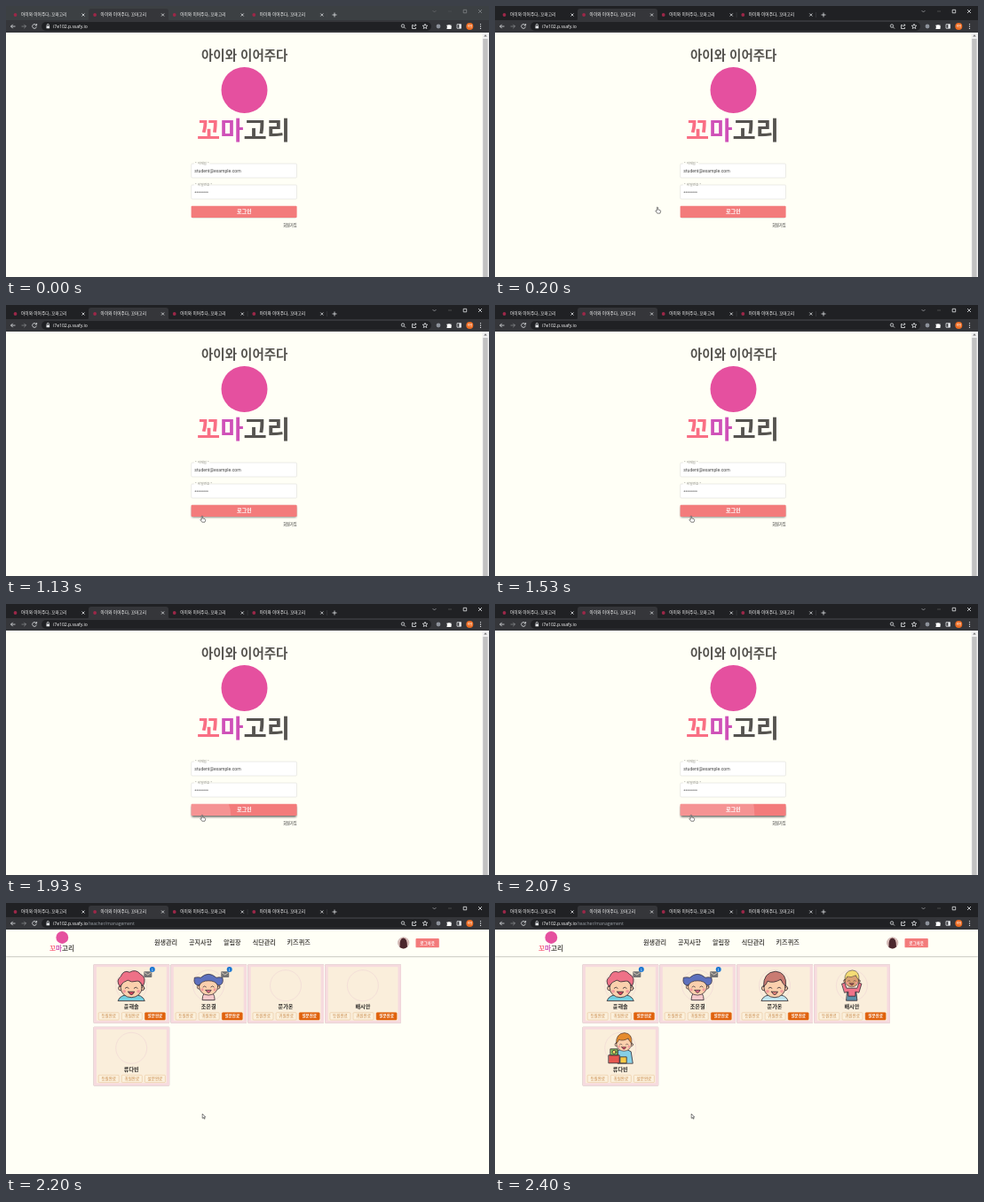
These frames come from a looping animation (544 by 306 pixels, 3.34 s). An HTML page:

```html
<!DOCTYPE html>
<html lang="ko">
<head>
<meta charset="utf-8">
<title>꼬마고리</title>
<style>
html, body { margin: 0; width: 100%; height: 100%; overflow: hidden; background: #fffff6; }
svg { display: block; width: 100vw; height: 100vh; font-family: "Noto Sans CJK KR", "Noto Sans CJK", sans-serif; }
.latin { font-family: "Open Sans", sans-serif; }
.form { font-family: Roboto, sans-serif; }
.icon { fill: none; stroke: #e4e6e9; stroke-width: .8; }
.kid { stroke: #2f2932; stroke-width: .8; stroke-linejoin: round; stroke-linecap: round; }
</style>
</head>
<body>
<svg id="stage" viewBox="0 0 544 306"></svg>
<script>
const LOOP = 3340, TICK = 1000 / 15;
const CORAL = '#f37b7b', INK = '#55534f';

const rect = (x, y, w, h, fill, more = '') => `<rect x="${x}" y="${y}" width="${w}" height="${h}" fill="${fill}" ${more}/>`;
const circle = (x, y, r, fill, more = '') => `<circle cx="${x}" cy="${y}" r="${r}" fill="${fill}" ${more}/>`;
const path = (d, fill = 'none', more = '') => `<path d="${d}" fill="${fill}" ${more}/>`;
const icon = (d, more = '') => `<path class="icon" d="${d}" ${more}/>`;
const group = (id, body, more = '') => `<g id="${id}" ${more}>${body}</g>`;
// y is the middle of the line
const text = (x, y, size, str, fill, more = '') =>
  `<text x="${x}" y="${y + size * .37}" font-size="${size}" fill="${fill}" ${more}>${str}</text>`;
const MID = 'text-anchor="middle" ', BOLD = 'font-weight="700"';

function browser() {
  const tabs = [0, 1, 2, 3].map(i => {
    const x = 89.6 * i;
    return circle(x + 10.5, 10, 1.9, '#9c2748') +
      text(x + 17, 9.6, 4.7, '아이와 이어주다, 꼬마고리', '#fff') +
      icon(`M${x + 85.5} 8.5l3 3m0 -3l-3 3`) +
      (i > 1 ? rect(x + 92.6, 7, .5, 6, '#44474b') : '');
  }).join('');
  return rect(0, 0, 544, 16.5, '#202124', 'id="frame"') +
    path('M91 16.5q2 0 2 -2v-8.500q0 -3 3 -3h84q3 0 3 3v8.500q0 2 2 2z', '#35363a') + tabs +
    icon('M367.500 10h5m-2.500 -2.500v5') +
    group('controls', icon('M480.500 5l2 2l2 -2', 'opacity=".6"') + icon('M498 6h4', 'opacity=".25"') +
      icon('M515.200 4.300h3.500v3.500h-3.500z', 'stroke-width=".6"') + icon('M532 4l4 4m0 -4l-4 4')) +
    rect(0, 16, 544, 14, '#35363a') + rect(40, 18, 439, 10, '#202124', 'rx="5"') +
    icon('M10.500 23h-5m2.200 -2.200l-2.200 2.200l2.200 2.200') +
    icon('M17.500 23h5m-2.200 -2.200l2.200 2.200l-2.200 2.200', 'opacity=".45"') +
    icon('M34 21.500a2.400 2.400 0 1 0 .4 2M34.600 20v2h-2') +
    rect(45.5, 22.5, 3.6, 2.8, '#e4e6e9') + icon('M46.200 22.500v-1a1.100 1.100 0 0 1 2.200 0v1', 'stroke-width=".6"') +
    `<text class="latin" x="53" y="24.900" font-size="5.050" fill="#fff">i7e102.p.ssafy.io<tspan id="route" fill="#9aa0a6">/teacher/management</tspan></text>` +
    circle(447, 22.5, 1.7, 'none', 'class="icon"') + icon('M448.300 23.800l1.700 1.700') +
    icon('M459 21.500h-1.500v4h4v-1.500M459 23.500q.5 -2 3 -2m-1.200 -1.200l1.200 1.200l-1.200 1.200') +
    icon('M472 20.300l.8 1.800l2 .1l-1.500 1.300l.5 2l-1.800 -1.100l-1.800 1.100l.5 -2l-1.500 -1.300l2 -.1z') +
    circle(487, 23, 2.4, '#8d929b') +
    path('M496.500 21.500h1.600a1 1 0 0 1 1.800 0h1.600v1.500a1 1 0 0 1 0 1.600v1.400h-5v-1.400a.9 .9 0 0 0 0 -1.600z', '#fff') +
    icon('M508 20.700h4.500v4.500h-4.500z') + rect(510.3, 20.7, 2.2, 4.5, '#e4e6e9') +
    circle(522.3, 23, 4, '#ee6c22') + text(522.3, 23, 3.2, '새별', '#fff', MID) +
    [20.6, 23, 25.4].map(y => circle(534.5, y, .65, '#e4e6e9')).join('');
}

const logo = () => circle(268.5, 95, 26, '#e5509f') +
  `<text x="215" y="151" font-size="28.500" font-weight="900" fill="${INK}"><tspan fill="#f96f84">꼬</tspan><tspan fill="#cf50b8">마</tspan>고리</text>`;

function login() {
  const field = (y, label) => rect(208.7, y, 118.8, 16, '#fff', 'rx="1.200" stroke="#d2d2cd" stroke-width=".45"') +
    rect(212, y - 1, 17.5, 2, '#fffffa') + text(213, y - .6, 3.7, label, '#85857f');
  const dots = Array.from({ length: 8 }, (_, i) => circle(213.3 + i * 1.95, 210.2, .65, '#555')).join('');
  return text(220, 56, 14.5, '아이와 이어주다', INK, BOLD) + logo() +
    field(178, '* 이메일 *') + `<text class="form" x="212.300" y="187.900" font-size="5.100" fill="#444">student@example.com</text>` +
    field(202, '* 비밀번호 *') + dots +
    rect(209.2, 226.2, 117.8, 12.6, '#000', 'rx="1" id="shadow"') +
    rect(208.6, 225.8, 119, 13.2, CORAL, 'rx=".9"') +
    circle(222, 238, 0, '#fff', 'id="ripple" fill-opacity=".18" clip-path="url(#buttonClip)"') +
    text(268.3, 231.8, 6.1, '로그인', '#fff', MID + BOLD) +
    text(327.6, 247.4, 4.2, '회원가입', '#222', 'text-anchor="end"') +
    rect(536.5, 30, 7.5, 276, '#f1f1f1') + rect(537.2, 37, 5.4, 269, '#c1c1c1') + path('M538.200 34.500l1.800 -2.200l1.800 2.200z', '#777');
}

function header() {
  const menu = ['원생관리', '공지사항', '알림장', '식단관리', '키즈퀴즈'];
  const left = [167, 206, 245, 277.700, 316.600];
  return rect(0, 30, 544, 30, '#fffff6', 'style="filter:drop-shadow(0 .7px .9px rgba(0,0,0,.5))"') +
    `<g transform="translate(-8.400 13.600) scale(.267)">${logo()}</g>` +
    menu.map((m, i) => text(left[i], 44.8, 7.1, m, INK, BOLD)).join('') +
    circle(447.7, 45, 6.5, '#c5c5c3') +
    group('photo', circle(447.7, 45, 6.5, '#d9bcb8') +
      path('M443.500 50q-.5 -10.500 4 -10.500t4.500 10q-4 3.500 -8.500 .5z', '#4b272d')) +
    rect(461.5, 40, 26.3, 10.3, CORAL, 'rx=".9"') + text(474.6, 45.1, 4.5, '로그아웃', '#fff', MID + BOLD);
}

// Children are drawn around their own centre.
const SKIN = '#fbd0ad';
function face(hair, hairShape, mouth, skin = SKIN) {
  return circle(-12, 3, 2.6, skin) + circle(12, 3, 2.6, skin) +
    `<ellipse cy="2.500" rx="12" ry="11" fill="${skin}"/>` + path(hairShape, hair) +
    path('M-7 3q2 -2.500 4 0M3 3q2 -2.500 4 0') + path('M-3.500 7h7q-3.500 7 -7 0z', mouth) +
    circle(-8, 6.5, 1.8, '#f29a9c', 'stroke="none"') + circle(8, 6.5, 1.8, '#f29a9c', 'stroke="none"');
}
const SPIKES = 'M-13 1Q-18 -6 -12 -10Q-9 -18 -2 -15Q5 -19 10 -13Q18 -9 13 1Q10 -6 6 -5Q0 -3 -4 -6Q-9 -5 -13 1z';
const CAP = 'M-12.500 1Q-13 -15 1 -16Q14 -15 12.500 1Q8 -3 7 -7Q-2 -2 -8 -5Q-9 -1 -12.500 1z';
const TAILS = 'M-12 1Q-20 1 -18 -9Q-13 -10 -10 -9Q0 -18 10 -9Q13 -10 18 -9Q20 1 12 1Q9 -5 0 -5Q-9 -5 -12 1z';
const shirt = color => path('M-15 17Q-13 10 0 10Q13 10 15 17z', color);
const small = (body, x, y, s) => `<g transform="translate(${x} ${y}) scale(${s})">${body}</g>`;

const kids = [
  shirt('#72cfe0') + face('#ee7187', SPIKES, '#d9455f'),
  path('M-7 16Q-7 7 0 7Q7 7 7 16z', '#f7c9cb') + small(face('#5d70bd', TAILS, '#e7708a'), 0, -1, .88),
  shirt('#bfe4ee') + face('#c97b72', CAP, '#e8837c'),
  path('M-5 8h10l1 9h-12z', '#5b8fa8') + path('M-11 -2l3 -1l2 6h12l2 -6l3 1l-3 10l-4 -1v5h-8v-5l-4 1z', '#f07389') +
    small(face('#f4dc75', CAP, '#a94f4f', '#d9a073'), 0, -7, .64),
  path('M-3 17v-14q7 -4 15 1l2 13z', '#86cfe6') + small(face('#e58b2d', CAP, '#d9455f'), 4, -6, .7) +
    rect(-13, 8, 12, 9, '#e5564f') + rect(-11, 1, 8, 7, '#7cbf5a') + circle(-7, 4.5, 2, '#ffe169') + rect(0, 10, 7, 7, '#f6c945')
];
const names = ['윤해솔', '조은결', '문가온', '배시안', '류다빈'];

function card(name, i) {
  const chip = (label, n, filled) => {
    const x = 5.7 + 26.1 * n;
    return rect(x, 54.7, 23, 8.3, filled ? '#e0620d' : '#fbf0dc', `rx="1" stroke="${filled ? '#e0620d' : '#e4bc8e'}" stroke-width=".5"`) +
      text(x + 11.5, 58.7, 4.5, label, filled ? '#fff' : '#c78746', MID + (filled ? BOLD : ''));
  };
  const mail = rect(56.8, 8.3, 9, 6.6, '#747474', 'rx=".7"') + path('M57.500 9.500l3.800 2.600l3.800 -2.600', 'none', 'stroke="#faecd7" stroke-width=".7"') +
    circle(66.3, 6.1, 3, '#1976d2') + text(66.3, 6.1, 4, '1', '#fff', MID);
  return `<g transform="translate(${98.5 + 86.900 * (i % 4)} ${69 + 70.600 * (i >> 2)})">` +
    rect(0, .2, 85.7, 66.6, '#f6dade', 'rx="1" style="filter:drop-shadow(0 .5px .5px rgba(0,0,0,.3))"') +
    rect(3.4, 3.2, 78.9, 60.6, '#faeedb') +
    circle(42.7, 24.2, 17.5, 'none', 'stroke="#f4dfd8" stroke-width="1"') +
    group('kid' + i, kids[i], 'class="kid" transform="translate(42.700 24.200)"') +
    (i < 2 ? mail : '') + text(42.7, 47.8, 6.1, name, '#2b2927', MID + BOLD) +
    chip('등원완료', 0) + chip('귀원완료', 1) + chip('설문완료', 2, i < 4) + '</g>';
}

const stage = document.getElementById('stage');
stage.innerHTML = `<defs><clipPath id="buttonClip">${rect(208.6, 225.8, 119, 13.2, '#000', 'rx=".9"')}</clipPath></defs>` +
  rect(0, 0, 544, 306, '#fffff6') + group('login', login()) +
  group('dashboard', header() + group('empty', text(97, 72.1, 7.27, '현재 반에 등록된 원아가 없습니다.', INK, BOLD)) +
    group('cards', names.map(card).join(''))) +
  browser() +
  group('pointer', path('M-.7 0q.7 -.9 1.300 0v2.500l2.500 .6q.8 .4 .5 1.600l-.6 2h-3.200l-2 -2.800q.2 -.8 1.500 0z', '#fff', 'stroke="#333" stroke-width=".6"')) +
  path('M221.200 238v5.200l1.200 -1.100l.9 1.900l.8 -.4l-.9 -1.800h1.700z', '#fff', 'id="arrow" stroke="#222" stroke-width=".55"');

const $ = id => document.getElementById(id);
const show = (id, on) => $(id).style.display = on ? '' : 'none';
const progress = (t, start, length) => Math.min(1, Math.max(0, (t - start) / length));
const smooth = p => p * p * (3 - 2 * p);

function draw(ms) {
  const t = Math.floor((ms % LOOP + 4) / TICK) * TICK;
  const active = t >= 130, inside = t >= 2130, loaded = t >= 2195;
  $('frame').setAttribute('fill', active ? '#202124' : '#3c4043');
  $('controls').setAttribute('opacity', active ? 1 : .4);

  show('login', !inside);
  show('dashboard', inside);
  show('route', inside);
  show('empty', !loaded);
  show('cards', loaded);
  show('photo', loaded);
  [2195, 2195, 2260, 2330, 2395].forEach((start, i) => show('kid' + i, t >= start));

  show('pointer', active && !inside);
  show('arrow', inside);
  const move = 1 - (1 - progress(t, 65, 535)) ** 3;
  $('pointer').setAttribute('transform', `translate(${130 + 91 * move} ${212 + 26.500 * move})`);

  const level = 1 + 1.5 * smooth(progress(t, 600, 280)) + 2 * smooth(progress(t, 1740, 200));
  $('shadow').style.filter = `blur(${.3 + level * .2}px)`;
  $('shadow').setAttribute('transform', `translate(0 ${level * .4})`);
  $('shadow').setAttribute('opacity', .35 + level * .06);
  $('ripple').setAttribute('r', 110 * smooth(progress(t, 1740, 550)));
}

function loop(now) {
  draw(now);
  requestAnimationFrame(loop);
}
draw(0);
requestAnimationFrame(loop);
</script>
</body>
</html>
```
